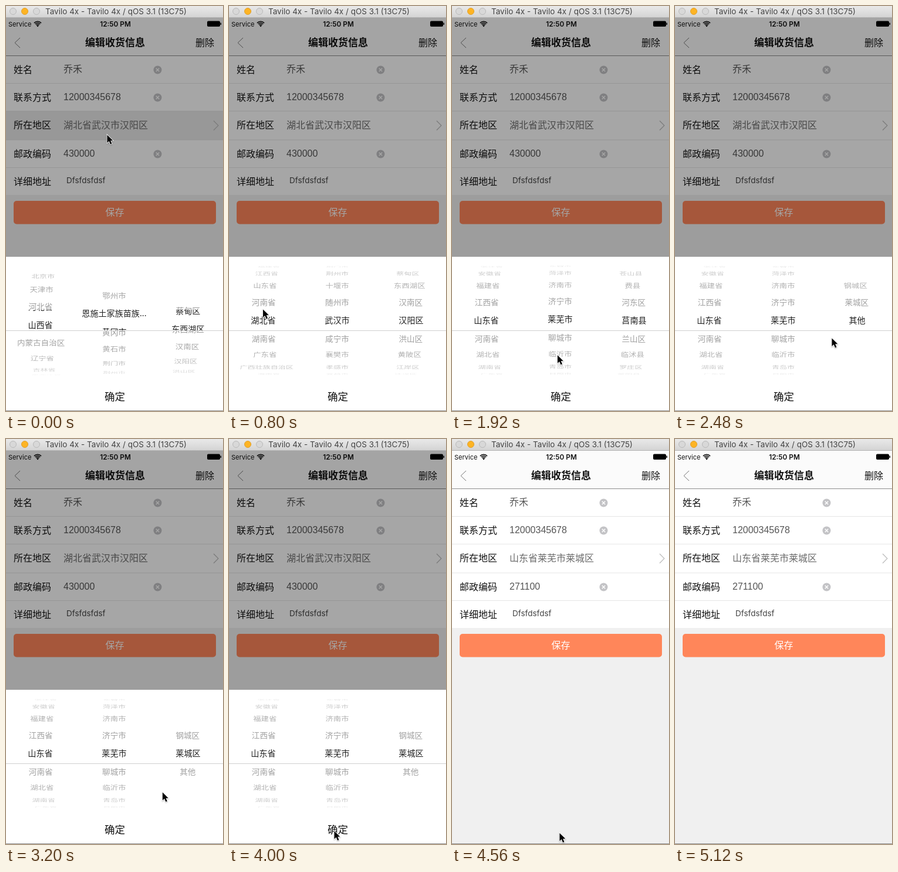
These frames come from a looping animation (370 by 688 pixels, 5200 ms). An HTML page with a canvas:

```html
<!DOCTYPE html>
<html lang="zh-CN">
<head>
<meta charset="utf-8">
<title>编辑收货信息</title>
<style>
  html, body { margin: 0; width: 100%; height: 100%; overflow: hidden; background: #f0f0f0; }
  canvas { display: block; width: 370px; height: 688px; }
</style>
</head>
<body>
<canvas id="stage" width="370" height="688"></canvas>
<script>
const W = 370, H = 688, LOOP = 5200, STEP = 80;
const ctx = document.getElementById('stage').getContext('2d');
const CJK = '"Noto Sans CJK SC", "Noto Sans CJK", sans-serif';
const UI = 'Inter, sans-serif';
const ARIAL = '"Liberation Sans", sans-serif';

const split = s => s.split(' ');
const PROVINCES = split('北京市 天津市 河北省 山西省 内蒙古自治区 辽宁省 吉林省 黑龙江省 上海市 江苏省 浙江省 安徽省 福建省 江西省 山东省 河南省 湖北省 湖南省 广东省 广西壮族自治区 海南省 重庆市 四川省');
const HUBEI = split('鄂州市 恩施土家族苗族... 黄冈市 黄石市 荆门市 荆州市 十堰市 随州市 武汉市 咸宁市 襄樊市 孝感市 宜昌市');
const SHANDONG = split('滨州市 德州市 东营市 菏泽市 济南市 济宁市 莱芜市 聊城市 临沂市 青岛市 日照市 泰安市 威海市 潍坊市 烟台市');
const WUHAN = split('蔡甸区 东西湖区 汉南区 汉阳区 洪山区 黄陂区 江岸区 江汉区 江夏区');
const LINYI = split('苍山县 费县 河东区 莒南县 兰山区 临沭县 罗庄区 蒙阴县 平邑县');
const LAIWU = split('钢城区 莱城区 其他');

// Moments when a settled wheel reloads the ones to its right
const PROVINCE_SET = 1520, CITY_SET = 2240;
const CLOSE_START = 4120, CLOSE_END = 4520, CURSOR_GONE = 5120;
const PANEL_TOP = 426;

const PROVINCE_POS = [[-200, 0], [560, 16], [860, 16], [1200, 14]];
const CITY_POS = [[-200, 0], [560, 8], [1560, 8], [1960, 6]];
const AREA_POS = [[-200, 0], [560, 3], [CITY_SET - 1, 3], [CITY_SET, 2], [2640, 2], [3040, 1]];
const CURSOR_X = [[80, 172.5], [640, 57.5], [1200, 60], [1440, 177.5], [1960, 180], [2480, 267.5], [3120, 270], [3840, 179.5], [4080, 179.5], [4320, 183.5]];
const CURSOR_Y = [[80, 219], [640, 515.5], [860, 515.5], [1200, 575], [1440, 533.5], [1560, 533.5], [1960, 595], [2480, 564.5], [2640, 564.5], [3040, 598], [3120, 598], [3840, 666], [4080, 666], [4320, 669.5]];

const smooth = u => { u = Math.min(1, Math.max(0, u)); return u * u * (3 - 2 * u); };

function track(keys, t) {
  let [t0, v0] = keys[0];
  for (const [t1, v1] of keys) {
    if (t < t1) return t1 > t0 ? v0 + (v1 - v0) * smooth((t - t0) / (t1 - t0)) : v1;
    [t0, v0] = [t1, v1];
  }
  return v0;
}

function rect(x, y, w, h, color) {
  ctx.fillStyle = color;
  ctx.fillRect(x, y, w, h);
}

function roundRect(x, y, w, h, r, color) {
  ctx.beginPath();
  ctx.roundRect(x, y, w, h, r);
  ctx.fillStyle = color;
  ctx.fill();
}

// y is the visual middle of the glyphs
function text(str, x, y, size, color, { font = CJK, align = 'left', weight = 400 } = {}) {
  ctx.font = `${weight} ${size}px ${font}`;
  ctx.textAlign = align;
  ctx.textBaseline = 'alphabetic';
  ctx.fillStyle = color;
  ctx.fillText(str, x, y + size * 0.37);
}

function line(points, color, width = 1) {
  ctx.beginPath();
  points.forEach(([x, y]) => ctx.lineTo(x, y));
  ctx.strokeStyle = color;
  ctx.lineWidth = width;
  ctx.stroke();
}

function disc(x, y, r, fill, stroke) {
  ctx.beginPath();
  ctx.arc(x, y, r, 0, Math.PI * 2);
  ctx.fillStyle = fill;
  ctx.fill();
  if (!stroke) return;
  ctx.strokeStyle = stroke;
  ctx.lineWidth = 1;
  ctx.stroke();
}

function drawTitleBar() {
  const g = ctx.createLinearGradient(0, 0, 0, 20);
  g.addColorStop(0, '#e9e9e9');
  g.addColorStop(1, '#d3d3d3');
  rect(0, 0, W, 20, g);
  rect(0, 19, W, 1, '#b4b4b4');
  disc(12, 9, 5.5, '#d8d8d8', '#b9b9b9');
  disc(32, 9, 5.5, '#fdb424', '#e0a02c');
  disc(52, 9, 5.5, '#d8d8d8', '#b9b9b9');
  text('Tavilo 4x - Tavilo 4x / qOS 3.1 (13C75)', 67, 9.5, 13.5, '#444', { font: UI });
}

function drawStatus() {
  text('Service', 4, 30.5, 11, '#111', { font: UI });
  for (const r of [3.4, 6, 8.6]) {
    ctx.beginPath();
    ctx.arc(54, 35, r, -Math.PI * 0.75, -Math.PI * 0.25);
    ctx.strokeStyle = '#111';
    ctx.lineWidth = 1.6;
    ctx.stroke();
  }
  disc(54, 34, 1.3, '#111');
  text('12:50 PM', 186.5, 30.5, 11.8, '#111', { font: UI, align: 'center', weight: 600 });
  roundRect(343, 25.5, 22, 9.5, 2, '#000');
  rect(365.5, 28.5, 1.5, 3.5, '#000');
}

function drawClear(y) {
  disc(258.5, y, 7, '#c3c3c6');
  line([[255.8, y - 2.7], [261.2, y + 2.7]], '#fff', 1.4);
  line([[261.2, y - 2.7], [255.8, y + 2.7]], '#fff', 1.4);
}

function drawForm(t) {
  const saved = t >= CLOSE_END;
  rect(0, 20, W, H - 20, '#f0f0f0');
  rect(0, 20, W, 64, '#fbfbfb');
  rect(0, 85, W, 236, '#fff');
  drawStatus();
  line([[24, 54], [15, 62.5], [24, 71]], '#666', 0.9);
  text('编辑收货信息', 186, 62, 17, '#111', { align: 'center', weight: 700 });
  text('删除', 323, 62, 16, '#111');
  rect(0, 84, W, 1, '#8c8c8c');

  const glow = 1 - smooth(t / 480);
  if (glow > 0) rect(0, 179, W, 48, `rgba(200,200,200,${0.4 * glow})`);
  for (const y of [131, 178, 227, 274]) rect(0, y, W, 1, '#e6e6e6');

  const labels = [['姓名', 108], ['联系方式', 155], ['所在地区', 202.5], ['邮政编码', 251], ['详细地址', 298]];
  for (const [name, y] of labels) text(name, 13, y, 16, '#111');
  text('乔禾', 98, 107, 16, '#555');
  text('12000345678', 98, 154.5, 16, '#555', { font: ARIAL });
  text(saved ? '山东省莱芜市莱城区' : '湖北省武汉市汉阳区', 98, 202.5, 16, '#6a6a6a');
  text(saved ? '271100' : '430000', 98, 250.5, 16, '#555', { font: ARIAL });
  text('Dfsfdsfdsf', 103, 296.5, 13.5, '#444', { font: UI });
  [108.5, 155.5, 251.5].forEach(drawClear);
  line([[354, 195], [362, 203], [354, 211]], '#b8b8b8', 1.1);

  roundRect(13, 331, 345, 39.5, 5, '#ff865a');
  text('保存', 185.5, 350.5, 16, '#fff', { align: 'center' });
}

const MID = 534, RADIUS = 93.6, ROW_ANGLE = 0.3377;
const BAND_TOP = 516, BAND_BOTTOM = 551;

// Rows lie on a cylinder; far rows flatten and drift to the middle
function drawRows(rows, pos, cx, size, ink) {
  rows.forEach((name, i) => {
    const a = (i - pos) * ROW_ANGLE;
    if (Math.abs(a) > 1.48) return;
    const depth = Math.cos(a), near = 1 / (1 + 0.1 * (1 - depth));
    ctx.save();
    ctx.translate(W / 2 + (cx - W / 2) * near, MID + RADIUS * Math.sin(a));
    ctx.scale(near, near * depth);
    text(name, 0, 0, size, ink(depth), { align: 'center' });
    ctx.restore();
  });
}

function drawWheel(rows, pos, cx) {
  const slice = (top, bottom, size, ink) => {
    ctx.save();
    ctx.beginPath();
    ctx.rect(0, top, W, bottom - top);
    ctx.clip();
    drawRows(rows, pos, cx, size, ink);
    ctx.restore();
  };
  const grey = depth => `rgba(0,0,0,${0.4 * depth})`;
  slice(430, BAND_TOP, 13.7, grey);
  slice(BAND_TOP, BAND_BOTTOM, 14.1, () => '#222');
  slice(BAND_BOTTOM, 640, 13.7, grey);
}

function drawPicker(t) {
  const shown = 1 - smooth((t - CLOSE_START) / (CLOSE_END - CLOSE_START));
  if (shown <= 0) return;
  ctx.save();
  ctx.globalAlpha = shown;
  rect(0, 20, W, PANEL_TOP - 20, 'rgba(0,0,0,.35)');
  rect(0, PANEL_TOP, W, H - PANEL_TOP, '#fff');
  const cities = t < PROVINCE_SET ? HUBEI : SHANDONG;
  const areas = t < PROVINCE_SET ? WUHAN : t < CITY_SET ? LINYI : LAIWU;
  drawWheel(PROVINCES, track(PROVINCE_POS, t), 58.5);
  drawWheel(cities, track(CITY_POS, t), 184.5);
  drawWheel(areas, track(AREA_POS, t), 310.5);
  rect(0, 551, W, 1, '#cfcfcf');
  text('确定', 185.5, 664, 17.5, '#111', { align: 'center' });
  ctx.restore();
}

function drawCursor(t) {
  if (t >= CURSOR_GONE) return;
  ctx.save();
  ctx.translate(track(CURSOR_X, t), track(CURSOR_Y, t));
  ctx.beginPath();
  for (const [x, y] of [[0, 0], [0, 13.5], [3.2, 10.6], [5.6, 16], [8, 15], [5.7, 9.8], [9.8, 9.6]]) ctx.lineTo(x, y);
  ctx.closePath();
  ctx.shadowColor = 'rgba(0,0,0,.3)';
  ctx.shadowBlur = 2;
  ctx.shadowOffsetY = 1;
  ctx.strokeStyle = '#fff';
  ctx.lineWidth = 1.6;
  ctx.stroke();
  ctx.shadowColor = 'transparent';
  ctx.fillStyle = '#000';
  ctx.fill();
  ctx.restore();
}

function draw(t) {
  drawForm(t);
  drawPicker(t);
  drawTitleBar();
  rect(0, 687, W, 1, '#8f8f8f');
  drawCursor(t);
}

const start = performance.now();
function tick() {
  const t = (performance.now() - start) % LOOP;
  draw(Math.floor(t / STEP) * STEP);
  requestAnimationFrame(tick);
}
tick();
</script>
</body>
</html>
```
